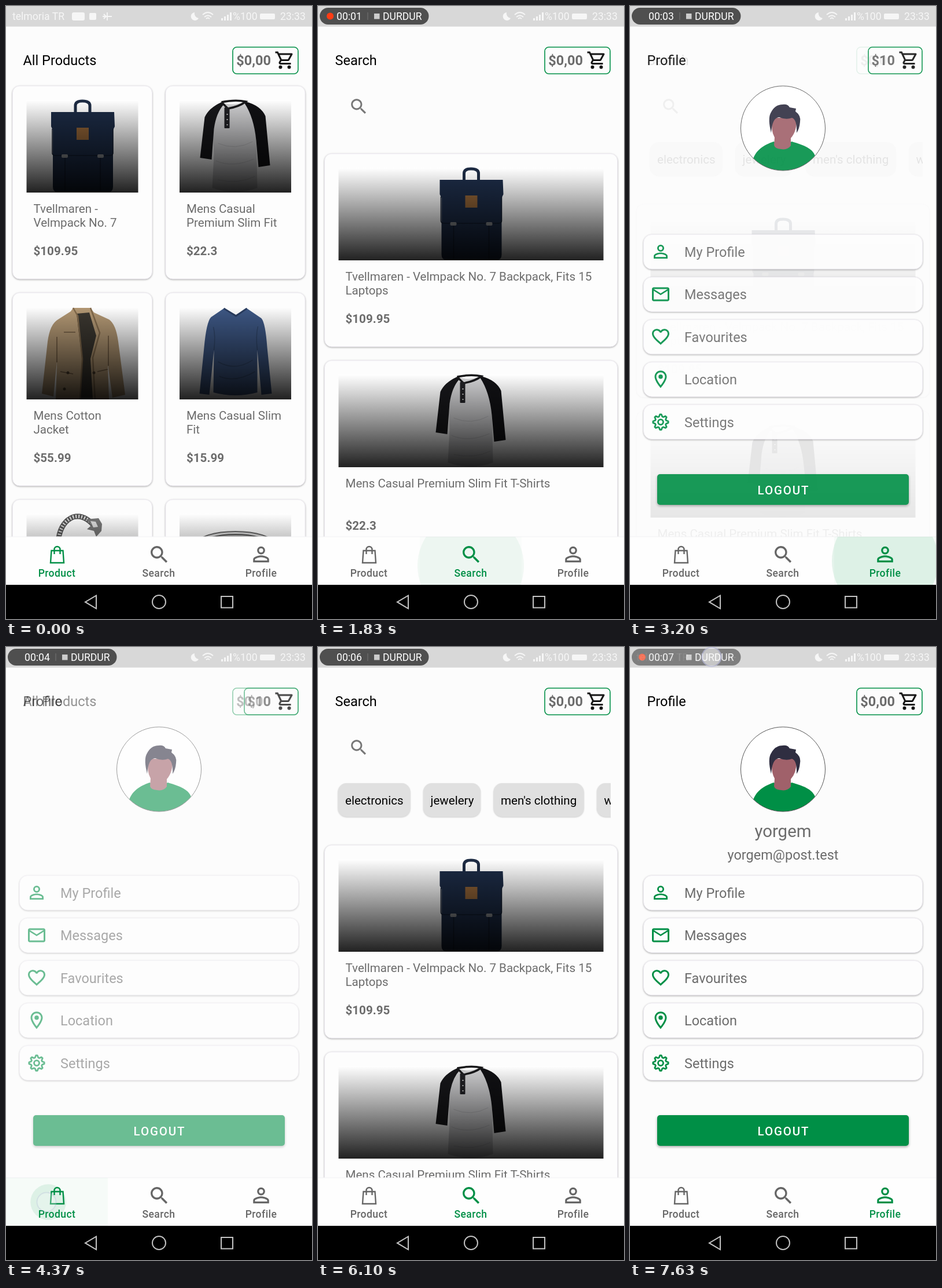
An HTML page that plays this animation: 529 by 1058 pixels, repeating every 7.66 s.

```html
<!DOCTYPE html>
<html lang="en">
<head>
<meta charset="utf-8">
<title>Shop app</title>
<style>
html, body { margin: 0; width: 100%; height: 100%; overflow: hidden; background: #fcfcfc; }
svg { display: block; font-family: Roboto, sans-serif; }
.card { fill: #fdfdfd; stroke: #eeebf2; filter: drop-shadow(0 1.5px 1.5px #0005); }
.body { font-size: 20.57px; fill: #6c6c6c; }
.big { font-size: 23.5px; }
.small { font-size: 17.6px; }
.tab { font-weight: 500; letter-spacing: .4px; text-anchor: middle; stroke: none; }
.gray { fill: #6c6c6c; }
.line { fill: none; }
</style>
</head>
<body>
<svg id="stage" width="529" height="1058" viewBox="0 0 529 1058"></svg>
<script>
const LOOP = 7660, FADE = 300, GREEN = '#008f46', GRAY = '#666';
const PRODUCTS = 0, SEARCH = 1, PROFILE = 2;

// start time, page, touch point
const visits = [
  [-1000, PRODUCTS, 88, 958],
  [1480, SEARCH, 268, 966],
  [2930, PROFILE, 441, 958],
  [4245, PRODUCTS, 70, 958],
  [5580, SEARCH, 278, 975],
  [6780, PROFILE, 441, 958]
];
const tabX = [88, 264, 441];

const icons = {
  search: 'M15.5 14h-.79l-.28-.27C15.41 12.59 16 11.11 16 9.5 16 5.91 13.09 3 9.5 3S3 5.91 3 9.5 5.91 16 9.5 16c1.61 0 3.09-.59 4.23-1.57l.27.28v.79l5 4.99L20.49 19zM9.5 14C7.01 14 5 11.99 5 9.5S7.01 5 9.5 5 14 7.01 14 9.5 11.99 14 9.5 14z',
  person: 'M12 5.9a2.1 2.1 0 1 1 0 4.2a2.1 2.1 0 0 1 0-4.2m0 9c2.97 0 6.1 1.46 6.1 2.1v1.1H5.9V17c0-.64 3.13-2.1 6.1-2.1M12 4a4 4 0 1 0 0 8a4 4 0 0 0 0-8zm0 9c-2.67 0-8 1.34-8 4v3h16v-3c0-2.66-5.33-4-8-4z',
  cart: 'M15.55 13c.75 0 1.41-.41 1.75-1.03l3.58-6.49c.37-.66-.11-1.48-.87-1.48H5.21l-.94-2H1v2h2l3.6 7.59-1.35 2.44C4.52 15.37 5.48 17 7 17h12v-2H7l1.1-2zM6.16 6h12.15l-2.76 5H8.53zM7 18a2 2 0 1 0 0 4a2 2 0 0 0 0-4zm10 0a2 2 0 1 0 0 4a2 2 0 0 0 0-4z',
  mail: 'M22 6c0-1.1-.9-2-2-2H4c-1.1 0-2 .9-2 2v12c0 1.1.9 2 2 2h16c1.1 0 2-.9 2-2zm-2 0l-8 5-8-5zm0 12H4V8l8 5 8-5z',
  heart: 'M16.5 3c-1.74 0-3.41.81-4.5 2.09C10.91 3.81 9.24 3 7.5 3 4.42 3 2 5.42 2 8.5c0 3.78 3.4 6.86 8.55 11.54L12 21.35l1.45-1.32C18.6 15.36 22 12.28 22 8.5 22 5.42 19.58 3 16.5 3zM12 18.65C7.14 14.24 4 11.39 4 8.5 4 6.5 5.5 5 7.5 5c1.54 0 3.04.99 3.57 2.36h1.87C13.46 5.99 14.96 5 16.5 5c2 0 3.5 1.5 3.5 3.5 0 2.89-3.14 5.74-8 10.15z',
  pin: 'M12 2C8.13 2 5 5.13 5 9c0 5.25 7 13 7 13s7-7.75 7-13c0-3.87-3.13-7-7-7zM7 9c0-2.76 2.24-5 5-5s5 2.24 5 5c0 2.88-2.88 7.19-5 9.88C9.92 16.21 7 11.85 7 9zM12 6.5a2.5 2.5 0 1 0 0 5a2.5 2.5 0 0 0 0-5z'
};

const icon = (name, x, y, scale, fill) =>
  `<path d="${icons[name]}" fill-rule="evenodd" transform="translate(${x} ${y}) scale(${scale}) translate(-12 -12)"${fill ? ` fill="${fill}"` : ''}/>`;
const text = (x, y, s, cls = 'body', extra = '') => `<text x="${x}" y="${y}" class="${cls}" ${extra}>${s}</text>`;
const rect = (x, y, w, h, r = 0, extra = '') => `<rect x="${x}" y="${y}" width="${w}" height="${h}" rx="${r}" ${extra}/>`;
const path = (d, fill) => `<path d="${d}" fill="${fill}"/>`;
const stroke = (d, color, w = 1) => `<path d="${d}" class="line" stroke="${color}" stroke-width="${w}"/>`;

function gear(x, y) {
  const points = [];
  for (let i = 0; i < 32; i++) {
    const r = i % 4 < 2 ? 13.2 : 9.8, a = (i - .5) * Math.PI / 16;
    points.push(`${x + r * Math.sin(a)},${y - r * Math.cos(a)}`);
  }
  return `<g class="line" stroke="${GREEN}" stroke-width="2.8" stroke-linejoin="round"><polygon points="${points.join(' ')}"/><circle cx="${x}" cy="${y}" r="4.5"/></g>`;
}

// Product pictures: origin at the top centre of the photo
const art = {
  bag: stroke('M-12 22V10Q-12 2 0 2Q13 2 13 10V22', '#1d2b43', 5)
    + path('M-54 21H55L56 46L53 52V150Q53 159 45 159H-43Q-51 159-51 150V52L-54 46Z', '#1c2b45')
    + stroke('M-52 50V92Q-52 96-46 96H46Q53 96 53 92V50M-30 100V158M31 100V158', '#101a2b', 1.5)
    + rect(-10, 48, 21, 21, 0, 'fill="#8f6236"')
    + rect(-36, 94, 11, 6, 2, 'fill="#85888b"') + rect(26, 94, 11, 6, 2, 'fill="#85888b"'),
  tee: path('M-24 4Q-5 12 18 3L35 20L37 100L38 152Q0 166-40 152L-37 95L-40 40Z', '#d0d0d2')
    + path('M-24 4Q-46 14-53 30L-61 100L-41 103L-37 50Q-33 22-20 8Z', '#17171a')
    + path('M18 3Q44 10 52 28L60 113L40 116L36 70Q32 30 16 6Z', '#111114')
    + stroke('M-24 4Q-18 10-13 15Q6 12 18 3Q0-1-24 4', '#18181a', 3.5)
    + rect(-19, 13, 9, 36, 1, 'fill="#202024"')
    + path('M-15 24h2v2h-2zM-15 33h2v2h-2zM-15 42h2v2h-2z', '#ccc')
    + stroke('M-30 75Q0 88 30 72M-34 105Q-5 118 32 102M-30 138Q5 146 34 132', '#b8b8bb'),
  jacket: path('M-16 2L14 2L20 10L46 22Q58 30 62 60L74 152L52 157L44 100L46 160H-46L-44 95L-50 155L-70 150L-60 60Q-56 30-42 22L-20 8Z', '#b39874')
    + path('M-10 12L12 10L24 50L14 90L18 160H-4L0 95Z', '#3b3730')
    + stroke('M-16 2L-8 16L0 90L-4 160M14 2L20 18L30 45L18 88L22 160', '#826a4c', 2.5)
    + stroke('M-32 44H-12M-38 112L-16 116M26 112L44 108M-44 52V96M45 50V102', '#6f5940', 1.6)
    + '<g fill="#4b3c2b"><circle cx="-25" cy="114" r="2.5"/><circle cx="20" cy="114" r="2.5"/><circle cx="-31" cy="142" r="2.5"/></g>',
  sweater: path('M-20 3L1 14L20 3L45 20Q52 28 55 70L63 150L45 152L38 75V148Q0 158-38 148L-37 75L-45 152L-62 150L-54 70Q-50 26-42 18Z', '#3d5784')
    + stroke('M-20 3L1 16L20 3', '#2a3d60', 3)
    + stroke('M-37 75Q-34 50-38 35M38 75Q35 50 39 34M-30 95Q0 112 30 92M-28 120Q0 132 34 112', '#304669', 1.5),
  bracelet: stroke('M-41 42Q-36 14-16 6Q5 0 24 26', '#555', 9)
    + '<path d="M-41 42Q-36 14-16 6Q5 0 24 26" class="line" stroke="#ddd" stroke-width="6" stroke-dasharray="2 3"/>'
    + path('M6 10L28 8L34 18L33 30L24 40L20 30L8 27L16 20Z', '#777') + path('M14 13l9 1 4 9-8 1z', '#ddd'),
  ring: '<ellipse cy="52" rx="66" ry="21" fill="#ddd" stroke="#666" stroke-width="2"/><ellipse cy="54" rx="58" ry="18" fill="#aaa" stroke="#555" stroke-width="2"/>'
};

function productCard(x, y, w, item, lines, price) {
  return rect(x, y, w, 333, 12, 'class="card"')
    + rect(x + 24, y + 24, w - 48, 160, 0, 'fill="#fff"')
    + `<g transform="translate(${x + w / 2} ${y + 24})">${art[item]}</g>`
    + rect(x + 24, y + 24, w - 48, 160, 0, 'fill="url(#shade)"')
    + lines.map((s, i) => text(x + 36, y + 219 + 24 * i, s)).join('')
    + text(x + 36, y + 292, price, 'body', 'font-weight="700"');
}

const header = (title, id) => text(29.5, 101.5, title, 'big') + `<g id="${id}"></g>`;
const cart = (sum, x) => rect(x, 71, 505 - x, 46, 7, `fill="none" stroke="${GREEN}" stroke-width="1.6"`)
  + text(458, 101.5, sum, 'big gray', 'font-weight="700" text-anchor="end"') + icon('cart', 482, 93.5, 1.5, '#151515');

const chip = (x, w, s) => rect(x, 235, w, 58, 15, 'fill="#e0e0e0" style="filter:drop-shadow(0 1px 1px #0003)"')
  + text(x + 12.5, 271.5, s, '', 'font-size="20.57"');

const menu = [['person', 'My Profile'], ['mail', 'Messages'], ['heart', 'Favourites'], ['pin', 'Location'], ['gear', 'Settings']]
  .map(([name, label], i) => {
    const y = 394.5 + i * 73.4;
    return rect(23.5, y, 482, 59.5, 14, 'class="card"')
      + (name === 'gear' ? gear(53, y + 30) : icon(name, 53, y + 29.5, 1.5, GREEN))
      + text(94, y + 38.5, label, 'big gray');
  }).join('');

const avatar = '<circle cx="264.5" cy="211" r="73" fill="#fff"/><g clip-path="url(#face)">'
  + path('M211 270C216 248 232 240 248 234Q264 240 280 234C300 240 318 246 321 262V290H211Z', GREEN)
  + path('M246 193H288Q289 216 278 228V241Q272 249 261 247Q250 246 249 240L250 227Q243 215 246 193Z', '#a0616a')
  + path('M244 219Q238 195 243 185Q250 170 264 170Q273 169 276 175L287 177L286 182Q296 189 294 200Q293 212 288 219Q289 196 280 193Q270 197 258 192Q246 192 244 219Z', '#2f2e41')
  + '</g><circle cx="264.5" cy="211" r="73" fill="none" stroke="#555"/>';

const pages = [
  header('All Products', 'cart0') + '<g id="grid">'
    + productCard(11.5, 138, 241, 'bag', ['Tvellmaren -', 'Velmpack No. 7'], '$109.95')
    + productCard(276, 138, 241, 'tee', ['Mens Casual', 'Premium Slim Fit'], '$22.3')
    + productCard(11.5, 495, 241, 'jacket', ['Mens Cotton', 'Jacket'], '$55.99')
    + productCard(276, 495, 241, 'sweater', ['Mens Casual Slim', 'Fit'], '$15.99')
    + productCard(11.5, 852, 241, 'bracelet', [], '') + productCard(276, 852, 241, 'ring', [], '') + '</g>',
  header('Search', 'cart1') + icon('search', 70.5, 173.5, 1.48, '#777')
    + '<g id="chips" clip-path="url(#chipArea)">' + chip(34.5, 125, 'electronics') + chip(182, 99, 'jewelery')
    + chip(303.5, 156, "men's clothing") + chip(482, 170, "women's clothing") + '</g><g id="list">'
    + productCard(11.5, 255, 506, 'bag', ['Tvellmaren - Velmpack No. 7 Backpack, Fits 15', 'Laptops'], '$109.95')
    + productCard(11.5, 612, 506, 'tee', ['Mens Casual Premium Slim Fit T-Shirts'], '$22.3') + '</g>',
  header('Profile', 'cart2') + avatar + '<g id="account" text-anchor="middle">'
    + text(264.5, 327.5, 'yorgem', 'gray', 'font-size="29.4"') + text(264.5, 367, 'yorgem@post.test', 'big gray') + '</g>'
    + menu + rect(47, 808, 435, 53, 5, `fill="${GREEN}" style="filter:drop-shadow(0 2px 2px #0005)"`)
    + text(265.5, 842.5, 'LOGOUT', '', 'font-size="20.57" font-weight="500" letter-spacing="1.85" text-anchor="middle" fill="#fff"')
];

const tabIcons = [
  '<path d="M78.5 940H98.5L100 961H77Z M83.5 946V938a5 5 0 0 1 10 0V946" class="line" stroke="currentColor" stroke-width="2.4"/>',
  icon('search', 265, 947, 1.66), icon('person', 441, 946.5, 1.72)
];
const tabs = ['Product', 'Search', 'Profile'].map((label, i) =>
  `<g id="tab${i}" fill="currentColor">${tabIcons[i]}${text(tabX[i], 984.5, label, 'small tab')}</g>`).join('');

const status = rect(0, 0, 529, 35.5, 0, 'fill="#d8d8d8"') + '<g fill="#f6f6f6">'
  + text(11, 24, 'telmoria TR', 'small') + rect(114, 11, 22, 14, 3) + rect(144, 12, 12, 12, 2)
  + '<path d="M326 11a7 7 0 1 0 7 10a8 8 0 0 1-7-10zM372 25v-4h3v4zm5 0v-7h3v7zm5 0V15h3v10zm5 0V11h3v14z"/>'
  + stroke('M167 18h16M175 11v14M169 14l4 4-4 4M340 15q9-8 18 0M343 19q6-5 12 0M346 22q3-3 6 0', '#f6f6f6', 1.8)
  + text(392, 24, '%100', 'small') + rect(439, 13, 26, 10, 2) + text(474, 24, '23:33', 'small') + '</g>';

const pill = '<g id="pill">' + rect(3, 3, 188.5, 29, 14.5, 'fill="#4f4f4f"')
  + '<circle id="dot" cx="21" cy="17.5" r="6" fill="#ff3c14"/>'
  + '<text id="clock" x="32" y="24" class="small" fill="#fff"></text>'
  + stroke('M86 11V24', '#777') + rect(97, 13, 9.5, 9.5, 0, 'fill="#ccc"') + text(112, 24, 'DURDUR', 'small', 'fill="#fff"') + '</g>';

const $ = id => document.getElementById(id);
$('stage').innerHTML = `<defs>
<linearGradient id="shade" x2="0" y2="1"><stop stop-opacity="0"/><stop offset="1" stop-opacity=".87"/></linearGradient>
<clipPath id="face"><circle cx="264.5" cy="211" r="73"/></clipPath>
<clipPath id="chipArea">${rect(0, 225, 506, 80)}</clipPath>
<clipPath id="navArea">${rect(0, 916, 529, 83)}</clipPath></defs>`
  + rect(0, 0, 529, 1058, 0, 'fill="#fcfcfc"')
  + pages.map((p, i) => `<g id="page${i}">${p}</g>`).join('')
  + rect(0, 916, 529, 83, 0, 'fill="#fefefe"') + stroke('M0 916H529', '#f2f2f4')
  + `<g clip-path="url(#navArea)" fill="${GREEN}"><rect id="glow" y="916" width="176" height="83"/><circle id="ripple"/></g>`
  + tabs + rect(0, 999, 529, 59)
  + `<g class="line" stroke="#c4c4c4" stroke-width="2"><path d="M156 1017.5V1040L137 1028.7Z"/><circle cx="264.5" cy="1028.5" r="11.5"/>${rect(372, 1019, 20, 19.5)}</g>`
  + status + pill + '<circle id="touch" r="16.5" fill="#fffc" stroke="#b9bbdc" stroke-width="2"/>';

const clamp = v => Math.max(0, Math.min(1, v));
const set = (id, attrs) => { for (const k in attrs) $(id).setAttribute(k, attrs[k]); };
const show = (id, on) => set(id, { opacity: +on });

function drawPages(t, now, before) {
  const p = clamp((t - now[0]) / FADE);
  for (let i = 0; i < 3; i++) {
    const alpha = i === now[1] ? p : before && i === before[1] ? 1 - p : 0;
    set('page' + i, { opacity: alpha, display: alpha ? 'inline' : 'none' });
    $('tab' + i).style.color = i === now[1] ? GREEN : GRAY;
  }
  const chips = t >= 1870 && t < 4000 || t >= 6060, loaded = t >= 7050;
  show('grid', t < 2000 || t >= 4700);
  show('list', t >= 1750 && t < 4000 || t >= 5850);
  set('list', { transform: `translate(0 ${chips ? 87 : 0})` });
  show('chips', chips);
  show('account', loaded);
  $('cart0').innerHTML = $('cart1').innerHTML = cart('$0,00', 392);
  $('cart2').innerHTML = loaded ? cart('$0,00', 392) : cart('$10', 412);
}

function drawTouch(t, [start, page, x, y], next) {
  const dt = t - start, grow = clamp((dt - 100) / 150), fade = 1 - clamp((dt - 290) / 120);
  set('ripple', {
    cx: x + (tabX[page] - x) * grow, cy: y, r: 18 + 74 * grow,
    opacity: dt > 40 ? .1 * fade : 0
  });
  set('glow', { x: tabX[page] - 88, opacity: dt > 0 ? .03 * fade : 0 });
  if (t >= 7600) set('touch', { cx: 141, cy: 17, opacity: .7 });
  else if (next && t >= next[0] - 210) set('touch', { cx: next[2], cy: next[3], opacity: .9 });
  else set('touch', { cx: x, cy: y, opacity: .9 * (1 - clamp((dt - 60) / 100)) });
}

function drawPill(t) {
  const beat = (t + LOOP - 70) % 1000;
  set('pill', { opacity: t >= 7600 ? .65 : clamp((t - 25) / 150) });
  show('dot', 0);
  set('dot', { opacity: beat < 500 ? 0 : clamp((beat - 490) / 70) });
  const phase = ((t - 70) % 1000 + 1000) % 1000;
  set('dot', { opacity: phase < 500 ? 0 : clamp((phase - 480) / 60) });
  $('clock').textContent = '00:0' + Math.max(0, Math.floor((t - 70) / 1000));
}

function frame() {
  const t = performance.now() % LOOP;
  const i = visits.findLastIndex(v => v[0] <= t);
  drawPages(t, visits[i], visits[i - 1]);
  drawTouch(t, visits[i], visits[i + 1]);
  drawPill(t);
  requestAnimationFrame(frame);
}
frame();
</script>
</body>
</html>
```
